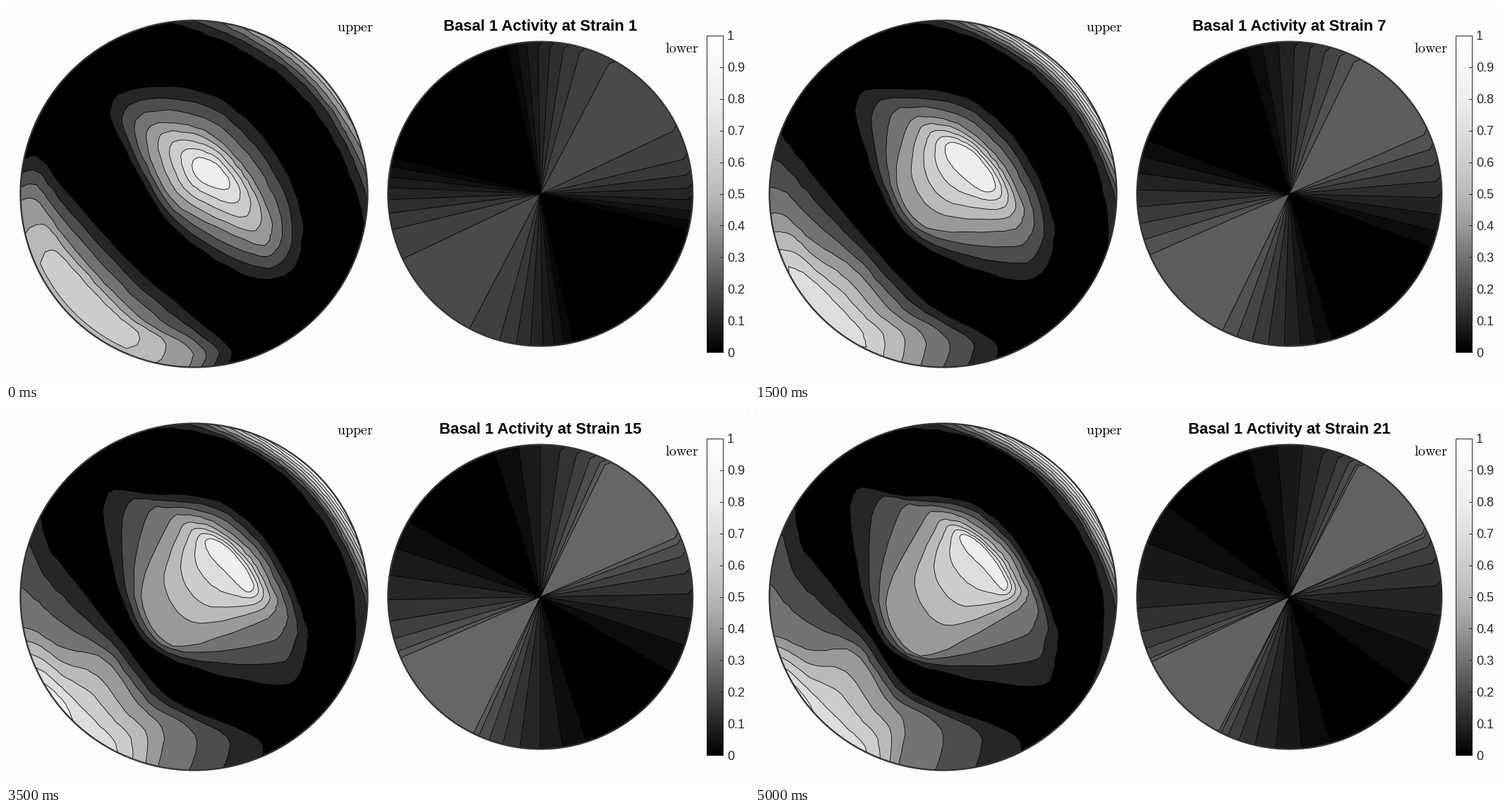
A matplotlib script for the animation above (5.25 s loop, 1053x532 px).

```python
import numpy as np
import matplotlib.pyplot as plt
from matplotlib.animation import FuncAnimation
from matplotlib.patches import Circle, Polygon, Rectangle

plt.rcParams["mathtext.fontset"] = "cm"

W, H, DPI = 1053, 532, 64      # 64 keeps the size exact in binary
PT = 72 / DPI                  # points per pixel
BG, DARK = "#fdfdfd", "#262626"
MID, R = np.array([266.5, 266.5]), 246      # left disc
MID2, R2 = np.array([757.3, 266.5]), 215.9  # right disc
LAST, LEVELS = 21, 8

# Key outlines of the central peak (levels 1, 4, 8), clockwise from north-west,
# at the first and the last strain.
PEAK = (
    ([(148, 143), (205, 114), (300, 130), (375, 200), (418, 290),
      (410, 368), (350, 385), (245, 322), (185, 235)],
     [(138, 123), (205, 122), (305, 133), (375, 195), (425, 300),
      (425, 355), (395, 393), (215, 357), (155, 270)]),
    ([(199, 180), (230, 165), (290, 182), (340, 232), (372, 290),
      (375, 327), (352, 337), (250, 287), (214, 238)],
     [(235, 165), (258, 145), (305, 160), (355, 200), (380, 245),
      (386, 268), (355, 295), (236, 350), (186, 275)]),
    ([(254, 212), (270, 205), (300, 217), (318, 237), (327, 250),
      (325, 268), (300, 267), (270, 253), (254, 232)],
     [(290, 183), (298, 178), (318, 190), (340, 215), (352, 235),
      (358, 250), (350, 256), (325, 227), (300, 202)]))

# Key fronts of the lower-left slope (levels 1, 4, 7), from the left rim
# to the bottom rim.
SLOPE = (
    ([(14, 224), (45, 214), (85, 262), (180, 368), (262, 438), (318, 487),
      (308, 516)],
     [(55, 110), (65, 190), (110, 250), (165, 325), (225, 403), (368, 463),
      (365, 515)]),
    ([(12, 280), (42, 275), (80, 325), (140, 393), (198, 448), (262, 487),
      (255, 520)],
     [(8, 318), (38, 325), (80, 343), (140, 345), (185, 410), (212, 450),
      (200, 520)]),
    ([(76, 384), (84, 384), (102, 396), (120, 415), (137, 434), (150, 452),
      (152, 461)],
     [(10, 350), (48, 372), (78, 400), (105, 427), (130, 452), (155, 478),
      (165, 515)]))


def gray(v):
    """Gray (0..1) of an activity value."""
    return np.interp(v, [0, .4, .5, .6, .8, 1], [0, 153, 185, 204, 238, 255]) / 255


def mix(a, b, u):
    a, b = np.asarray(a, float), np.asarray(b, float)
    return a + (b - a) * u


def progress(s):
    """Linear and eased progress of a strain step."""
    t = (s - 1) / (LAST - 1)
    return t, t ** .7


def spline(p, closed=False, n=6):
    """Catmull-Rom curve through the points."""
    if closed:
        q = np.vstack([p[-1:], p, p[:2]])
    else:
        q = np.vstack([p[:1], p, p[-1:]])
    a, b, c, d = (q[k:len(q) - 3 + k, None] for k in range(4))
    t = (np.arange(n) / n)[None, :, None]
    out = .5 * (2 * b + (c - a) * t + (2 * a - 5 * b + 4 * c - d) * t ** 2
                + (3 * b - a - 3 * c + d) * t ** 3)
    out = out.reshape(-1, 2)
    return out if closed else np.vstack([out, p[-1:]])


def polar(center, r, deg):
    t = np.radians(deg)
    return center + np.column_stack([r * np.cos(t), r * np.sin(t)])


rng = np.random.default_rng(5)
NOISE = rng.normal(0, 1, (3, LEVELS + 1, 60, 2))


def rough(p, part, level):
    return p + NOISE[part, level, :len(p)] * (.7 - .06 * level)


def peak_ring(s, level):
    _, u = progress(s)
    low, middle, high = (mix(a, b, u) for a, b in PEAK)
    core = high.mean(axis=0)
    high = core + (high - core) * (1 - .3 * np.exp(1 - s))
    if level < 4:
        ring = mix(low, middle, (level - 1) / 3)
    else:
        ring = mix(middle, high, ((level - 4) / 4) ** (1 - .25 * u))
    return rough(spline(ring, True), 0, level)


def slope_area(s, level):
    _, u = progress(s)
    low, middle, high = (mix(a, b, u) for a, b in SLOPE)
    if level < 4:
        front, back = mix(low, middle, (level - 1) / 3), 25
    else:
        k = (level - 4) / 3
        front, back = mix(middle, high, k), mix(20, mix(-20, 30, u), k)
    ends = front[[-1, 0]] - MID
    a, b = np.degrees(np.arctan2(ends[:, 1], ends[:, 0])) % 360
    arc = polar(MID, R + back, np.linspace(a + 3, b - 3, 30))
    return np.vstack([rough(spline(front), 1, level), arc])


def rim_area(s, level):
    """Crescent along the upper-right rim; the lowest level has a long tail."""
    _, u = progress(s)
    gap = 3.6 + 3.4 * np.exp((1 - s) / 2.2)
    skirt = level == 1
    depth = 26 - gap * (level - 2) + 6 * skirt
    half = max(1, 46 + 2 * u - 1.15 * gap * (level - 2) + 16 * u * skirt)
    power = 2.5 - 1.1 * u * skirt
    x = np.linspace(-1.15, 1.15, 41)
    deg = -44 + 7 * u * skirt + half * x
    front = polar(MID, R - depth * (1 - np.abs(x) ** power), deg)
    if depth <= 0:
        front = polar(MID, R + 20, deg)
    return np.vstack([rough(front, 2, level), polar(MID, R + 40, deg[::-1])])


def spread(s, i):
    """Angles of sector i to both sides of the bright axis."""
    t, u = progress(s)
    inner = 18.5 + 2.5 * np.sin(np.pi * t) ** 2
    upper = 59 + 3 * u + 3 * np.sin(np.pi * t)
    lower = 57.6 + 23 * t
    k = (1 - i / (LEVELS - 1)) ** (.62 + 1.32 * t)
    return mix(inner, upper, k), mix(inner, lower, k)


def sector(s, i, turn):
    """Sector of the right disc; the upper-right ones curl at the rim."""
    up, down = spread(s, i)
    hi, lo = 43.8 + up, 43.8 - down
    curl = 1.8 if turn == 0 and i > 2 else 0
    deg = np.concatenate([[hi], np.linspace(hi - curl, lo + curl, 40), [lo]])
    r = np.full(42, R2)
    r[[0, -1]] *= .965
    return np.vstack([MID2, polar(MID2, r, turn - deg)])


fig = plt.figure(figsize=(W / DPI, H / DPI), dpi=DPI, facecolor=BG)
ax = fig.add_axes([0, 0, 1, 1])
ax.axis("off")

discs = []
for c, r in ((MID, R), (MID2, R2)):
    discs.append(ax.add_patch(Circle(c, r, fc="black", ec="none", zorder=1)))
    ax.add_patch(Circle(c, r, fc="none", ec="#333333", lw=2.3 * PT, zorder=5))


def area(disc, color):
    p = Polygon(np.zeros((3, 2)), fc=color, ec="black", lw=.8 * PT,
                joinstyle="round", zorder=2)
    ax.add_patch(p)
    p.set_clip_path(disc)
    return p


contours = [(shape, k, area(discs[0], str(gray(k / 10))))
            for shape in (peak_ring, slope_area, rim_area)
            for k in range(1, LEVELS + 1)]
sectors = [(i, turn, area(discs[1], "black"))
           for turn in (0, 180) for i in range(LEVELS)]

# Labels and colour bar
ax.text(469, 36, r"$\mathrm{upper}$", size=20 * PT, color="black")
ax.text(933.5, 66, r"$\mathrm{lower}$", size=20 * PT, color="black")
title = ax.text(757, 35, "", size=22 * PT, weight="bold", ha="center",
                family="Liberation Sans", color="black")

X0, X1, Y0, Y1 = 993, 1016, 42, 491
ramp = gray(np.linspace(1, 0, 256))[:, None]
ax.imshow(ramp, cmap="gray", vmin=0, vmax=1, extent=(X0, X1, Y1, Y0),
          aspect="auto", interpolation="nearest", zorder=2)
ax.set(xlim=(0, W), ylim=(H, 0))
ax.add_patch(Rectangle((X0, Y0), X1 - X0, Y1 - Y0, fc="none", ec=DARK,
                       lw=PT, zorder=3))
for i in range(11):
    y = Y1 + (Y0 - Y1) * i / 10
    ax.plot([X1 - 4, X1], [y, y], color=DARK, lw=PT, zorder=4)
    ax.text(1022, y + 6.5, f"{i / 10:g}", size=18 * PT, color=DARK,
            family="Liberation Sans")


def draw(frame):
    s = frame + 1
    t, _ = progress(s)
    title.set_text(f"Basal 1 Activity at Strain {s}")
    slope_top = 6 if s < 2 else 7 if s < 9 else 8
    for shape, level, patch in contours:
        patch.set_visible(shape is not slope_area or level <= slope_top)
        patch.set_xy(shape(s, level))
    top = (74 + 78 * t - 54 * t * t) / 255
    for i, turn, patch in sectors:
        patch.set_xy(sector(s, i, turn))
        patch.set_facecolor(str(top * (i + 1) / LEVELS))
    return []


anim = FuncAnimation(fig, draw, frames=LAST, interval=250, repeat=True,
                     repeat_delay=0, init_func=lambda: draw(0))
plt.show()
```
